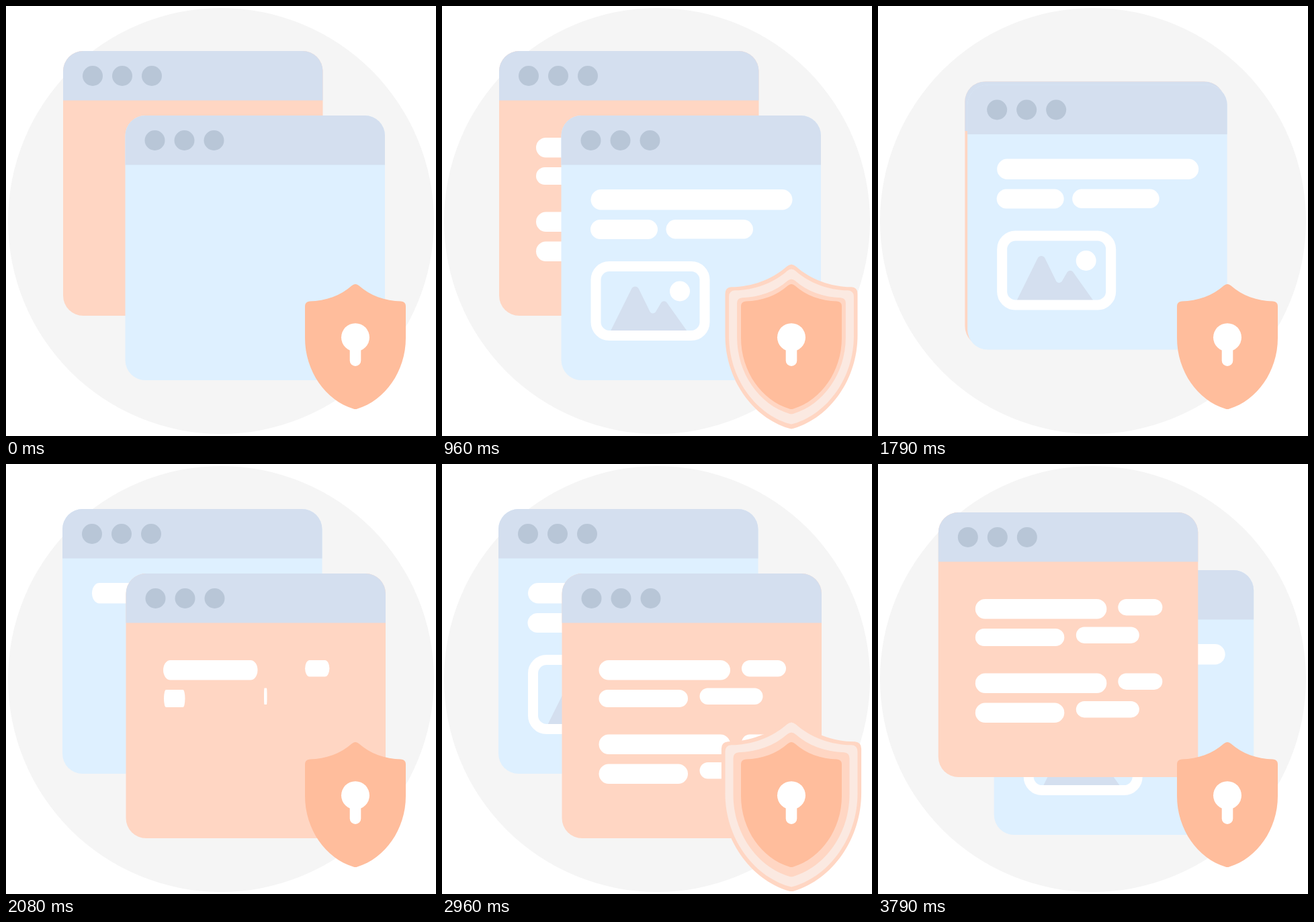
Animation, 640 px wide and 640 px high, one loop 3.83 s. Source, as an HTML page with a canvas:

```html
<!DOCTYPE html>
<html lang="en">
<head>
<meta charset="utf-8">
<title>Secure windows</title>
<style>
html, body { margin: 0; width: 100%; height: 100%; overflow: hidden; background: #fff; }
canvas { display: block; width: 640px; height: 640px; }
</style>
</head>
<body>
<canvas id="stage" width="640" height="640"></canvas>
<script>
const LOOP = 3830, TICKS = 92, HALF = 46;
const PEACH = '#ffd6c3', SKY = '#def0ff', HEADER = '#d4dfef', DOT = '#b8c6d7',
      SHIELD = '#ffbd9c', PALE = '#fbe9e1', WHITE = '#fff';

const ctx = document.getElementById('stage').getContext('2d');
const ringCanvas = document.createElement('canvas');
ringCanvas.width = ringCanvas.height = 640;
const ringCtx = ringCanvas.getContext('2d');

const clamp = v => Math.min(1, Math.max(0, v));
const ease = (t, start, length) => {
  const u = clamp((t - start) / length);
  return u * u * (3 - 2 * u);
};

function disc(x, y, r, color) {
  ctx.fillStyle = color;
  ctx.beginPath();
  ctx.arc(x, y, r, 0, Math.PI * 2);
  ctx.fill();
}

function box(x, y, w, h, radii, color) {
  ctx.fillStyle = color;
  ctx.beginPath();
  ctx.roundRect(x, y, w, h, radii);
  ctx.fill();
}

// Runs paint stretched around a pivot point
function scaled(px, py, sx, sy, paint) {
  if (sx <= 0) return;
  ctx.save();
  ctx.translate(px, py);
  ctx.scale(sx, sy);
  ctx.translate(-px, -py);
  paint();
  ctx.restore();
}

function bar(x, y, w, h, grow, pivot = 0) {
  scaled(x + pivot, y, grow, 1, () => box(x, y, w, h, h / 2, WHITE));
}

// Two paragraphs of two rows, each a long bar and a short one
function peachContent(tick) {
  for (let group = 0; group < 2; group++) {
    for (let row = 0; row < 2; row++) {
      const y = 129 + 110.5 * group + 44 * row;
      const start = 0.1 + 12 * group + 2 * row;
      const height = row > group ? 26 : 29.5;
      bar(55, y, 195.5 - 63 * row, height, ease(tick, start, 6), 2);
      bar(267.5 - 62.5 * row, y - 2.5 * row, 66 + 28 * row, 24.5,
          ease(tick, start + 0.7 + 0.4 * row, 6), 2.5 * row - 2);
    }
  }
}

function skyContent(tick) {
  bar(44, 110, 300, 30.5, ease(tick, 0.1, 6));
  bar(43.5, 155, 100, 29, ease(tick, 5, 6));
  bar(156, 155, 129.5, 28.5, ease(tick, 7, 6));
  const grow = ease(tick, 12, 8.5);
  scaled(132.5, 276, grow, grow, picture);
}

function picture() {
  ctx.fillStyle = HEADER;
  ctx.beginPath();
  ctx.moveTo(73.5, 320.5);
  ctx.arcTo(110, 247, 136, 300, 6);
  ctx.arcTo(136, 300, 152.5, 272, 5);
  ctx.arcTo(152.5, 272, 187, 320.5, 5);
  ctx.lineTo(187, 320.5);
  ctx.fill();
  disc(176.5, 261.5, 15, WHITE);
  ctx.strokeStyle = WHITE;
  ctx.lineWidth = 15;
  ctx.beginPath();
  ctx.roundRect(51.5, 224.5, 162, 103, 20);
  ctx.stroke();
}

function drawWindow(x, y, color, content, tick) {
  ctx.save();
  ctx.translate(x, y);
  box(0, 0, 386.5, 394, 30, color);
  box(0, 0, 386.5, 73.5, [30, 30, 0, 0], HEADER);
  for (let i = 1; i <= 3; i++) disc(44 * i, 37, 15, DOT);
  content(tick);
  ctx.restore();
}

// Right half of the outline; the left half is its mirror image
function shieldHalf(c) {
  c.beginPath();
  c.moveTo(-0.5, -93);
  c.lineTo(0, -93);
  c.quadraticCurveTo(2.5, -93, 5, -91);
  c.bezierCurveTo(22, -76, 44, -68, 68, -67.5);
  c.quadraticCurveTo(75, -67, 75, -60);
  c.lineTo(75, -13);
  c.bezierCurveTo(75, 37, 44, 80, 3, 92.5);
  c.quadraticCurveTo(1.5, 93, 0, 93);
  c.lineTo(-0.5, 93);
  c.fill();
}

function shield(c, scale, color) {
  c.fillStyle = color;
  for (const side of [-1, 1]) {
    c.save();
    c.translate(520, 507);
    c.scale(side * scale, scale);
    shieldHalf(c);
    c.restore();
  }
}

function pulse(tick) {
  if (tick < 14.6 || tick > 40) return;
  ringCtx.clearRect(0, 0, 640, 640);
  for (const [start, color] of [[14.6, PEACH], [16.6, PALE], [20.9, PEACH]]) {
    const grow = Math.min(32, 2.8 * (tick - start));
    if (grow > 0) shield(ringCtx, 1 + grow / 75, color);
  }
  ctx.globalAlpha = 1 - 0.9 * clamp((tick - 34) / 4);
  ctx.drawImage(ringCanvas, 0, 0);
  ctx.globalAlpha = 1;
}

function draw(frame) {
  const second = frame >= HALF;
  const tick = frame % HALF;
  const swap = second ? ease(frame, 84.23, 7.85) : ease(frame, 40.2, 5.8);
  const depth = second ? 1 - swap : swap;   // 0: sky in front, 1: peach in front

  ctx.fillStyle = WHITE;
  ctx.fillRect(0, 0, 640, 640);
  disc(320, 320, 317, '#f5f5f5');

  const sky = () => drawWindow(177.5 - 93.5 * depth, 163 - 96 * depth, SKY, skyContent, tick);
  const peach = () => drawWindow(85 + 93.5 * depth, 67 + 96 * depth, PEACH, peachContent, tick);
  (second ? [sky, peach] : [peach, sky]).forEach(paint => paint());

  pulse(tick);
  shield(ctx, 1, SHIELD);
  disc(520, 493.2, 21, WHITE);
  box(511.7, 500, 16.6, 36, 8.3, WHITE);
}

const origin = performance.now();
function loop() {
  const ms = (performance.now() - origin) % LOOP;
  // Motion steps at about 24 poses per second
  draw(Math.floor(ms * TICKS / LOOP + 0.1) % TICKS);
  requestAnimationFrame(loop);
}
loop();
</script>
</body>
</html>
```
